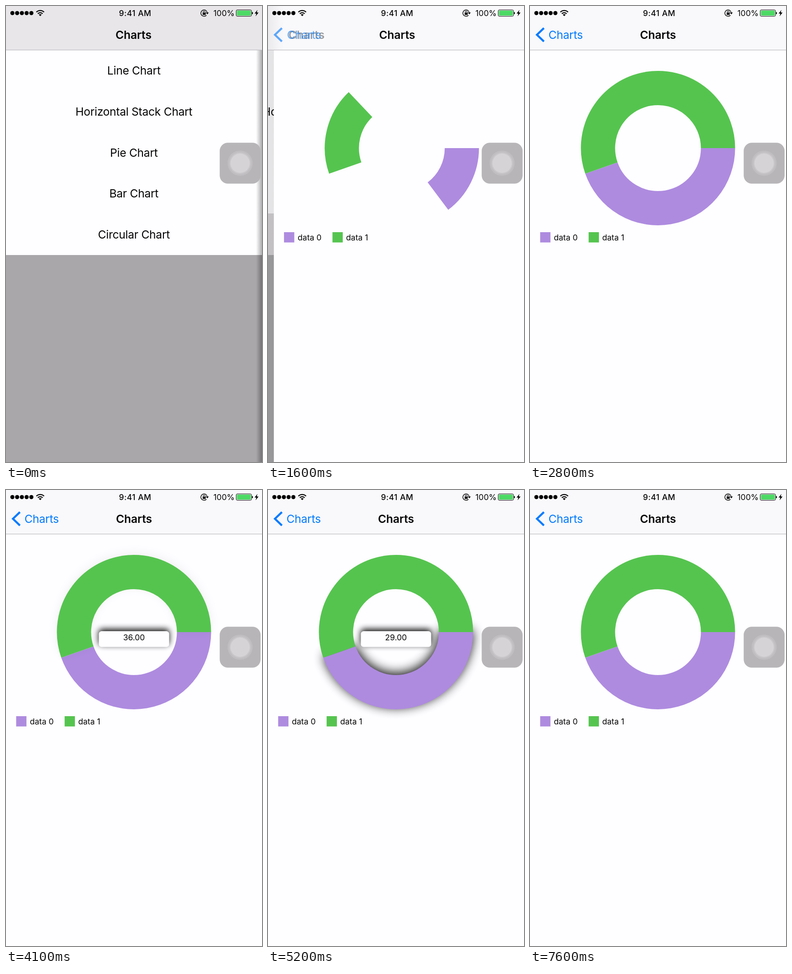
Write an HTML page that moves like this. It is 561x998 px and loops after 8 s.

```html
<!DOCTYPE html>
<html lang="en">
<head>
<meta charset="utf-8">
<title>Charts</title>
<style>
  html, body { margin: 0; width: 100%; height: 100%; overflow: hidden; background: #fefdff; }
  svg { display: block; width: 561px; height: 998px; }
  text { font: 400 24.6px Inter, "Open Sans", sans-serif; letter-spacing: -.27px; fill: #050505; }
  .mid { text-anchor: middle; }
  .title { font-weight: 600; letter-spacing: -.1px; }
  .small { font-size: 17.5px; letter-spacing: 0; }
  .clock { font-weight: 500; letter-spacing: .5px; }
  .sector { fill: none; stroke-width: 75; }
  .purple { stroke: #ae8bdf; }
  .green { stroke: #55c44f; }
  .shade { stroke: #000; }
</style>
</head>
<body>
<svg viewBox="0 0 561 998">
  <defs>
    <filter id="soft" filterUnits="userSpaceOnUse" x="40" y="70" width="480" height="480"><feGaussianBlur stdDeviation="12"/></filter>
    <filter id="tipSoft" filterUnits="userSpaceOnUse" x="150" y="260" width="260" height="130"><feGaussianBlur stdDeviation="7"/></filter>
    <linearGradient id="edge">
      <stop offset="0" stop-opacity="0"/><stop offset="1" stop-opacity=".32"/>
    </linearGradient>
    <linearGradient id="bar">
      <stop offset="0" stop-color="#e8e6e9"/><stop offset="1" stop-color="#f9f8fb"/>
    </linearGradient>
  </defs>

  <g id="menu">
    <rect width="561" height="998" fill="#a9a7aa"/>
    <rect y="90" width="561" height="455" fill="#fefdff"/>
    <rect id="pressed" y="454" width="561" height="91" fill="#d8d6d9"/>
    <g id="rows"></g>
  </g>
  <rect id="dim" width="561" height="998"/>

  <g id="page">
    <rect id="pageEdge" x="-13" width="13" height="998" fill="url(#edge)"/>
    <rect width="561" height="998" fill="#fefdff"/>
    <g id="ring"></g>
    <g fill="#ae8bdf"><rect x="22.3" y="495" width="22.5" height="22.5"/></g>
    <g fill="#55c44f"><rect x="128.5" y="495" width="22.5" height="22.5"/></g>
    <text class="small" x="52.3" y="513">data 0</text>
    <text class="small" x="158.3" y="513">data 1</text>
    <g id="tip">
      <rect x="203.5" y="304.5" width="154" height="34.5" rx="6" filter="url(#tipSoft)" opacity=".95"/>
      <rect x="203.5" y="309" width="154" height="34.5" rx="6" fill="#fefdff"/>
      <text id="tipText" class="small mid" x="280.5" y="329"></text>
    </g>
  </g>

  <rect id="barLeft" width="561" height="96" fill="#e8e6e9"/>
  <rect id="barBlend" width="40" height="96" fill="url(#bar)"/>
  <rect id="barRight" width="601" height="96" fill="#f9f8fb"/>
  <rect y="95.8" width="561" height="1.2" fill="#bcbabf"/>
  <text id="oldTitle" class="title" x="240" y="72">Charts</text>
  <text id="newTitle" class="title mid" x="280.5" y="72">Charts</text>
  <g id="back">
    <path d="M30.5 48.3 15.2 63 30.5 77.7" fill="none" stroke="#007aff" stroke-width="4.4"/>
    <text id="backText" x="40.5" y="72" style="fill:#007aff">Charts</text>
  </g>

  <g id="dots"></g>
  <g fill="none" stroke="#050505" stroke-width="2.4">
    <path d="M66.6 13.4a11.8 11.8 0 0 1 16.8 0"/>
    <path d="M69.8 16.8a7.3 7.3 0 0 1 10.4 0"/>
  </g>
  <path d="M75 22.2 71.9 19a4.4 4.4 0 0 1 6.2 0Z" fill="#050505"/>
  <text class="small clock mid" x="283" y="22">9:41 AM</text>
  <g fill="none" stroke="#050505" stroke-width="1.5">
    <path d="M439.3 20.2a7 7 0 1 1 1.7-5.4"/>
    <path d="M432.3 15v-2a2 2 0 0 1 4 0v2" stroke-width="1.2"/>
  </g>
  <rect x="431" y="14.6" width="6.6" height="5" rx=".6"/>
  <path d="M438 14.3h6.4l-3.2 4Z"/>
  <text class="small" x="454.5" y="22">100%</text>
  <rect x="504.5" y="8.5" width="33.5" height="14" rx="2.5" fill="none" stroke="#050505"/>
  <rect x="506" y="10" width="30.5" height="11" rx="1.2" fill="#4cd964"/>
  <path d="M539 13q2.2 0 2.2 2.5t-2.2 2.5Z"/>
  <path d="M551 8.5 544.8 16.4h3.8l-1.6 6 6.4-8.2h-3.9Z"/>

  <rect x="468.3" y="299.2" width="89.6" height="89.6" rx="18" fill="#b7b5b8"/>
  <g fill="#c0bec1"><circle cx="513" cy="344" r="27.5"/></g>
  <circle cx="513" cy="344" r="23.8" fill="#c8c6c9"/>
  <circle cx="513" cy="344" r="21.2" fill="#d5d3d6"/>
</svg>
<script>
const LOOP = 8000, STEP = 100, W = 561;
const PUSH = 1289, OMEGA = 18.26;     // critically damped page push
const GROW = 1270, GROW_TIME = 1000;  // ring drawing
const PULSE = 400;                    // half of a shadow pulse
const TIP_OFF = 5900, TIP_FADE = 300;
const VALUES = [29, 36];
const TAPS = [[3100, 0], [4080, 1], [4830, 0]];

const $ = id => document.getElementById(id);
const clamp = v => Math.min(1, Math.max(0, v));
const move = (id, x) => $(id).setAttribute('transform', `translate(${x} 0)`);
const fade = (id, a) => { $(id).style.opacity = a; };

function add(parent, tag, attrs, text = '') {
  const el = document.createElementNS('http://www.w3.org/2000/svg', tag);
  for (const k in attrs) el.setAttribute(k, attrs[k]);
  el.textContent = text;
  return $(parent).appendChild(el);
}

['Line', 'Horizontal Stack', 'Pie', 'Bar', 'Circular'].forEach((name, i) =>
  add('rows', 'text', { class: 'mid', x: 280.3, y: 150 + 89.75 * i }, name + ' Chart'));
for (let i = 0; i < 5; i++) add('dots', 'circle', { cx: 14 + 10.4 * i, cy: 15.5, r: 4.5 });

function arc(from, to) {
  const at = f => {
    const a = f * 2 * Math.PI;
    return `${280.5 + 131.5 * Math.cos(a)} ${311 + 131.5 * Math.sin(a)}`;
  };
  return `M${at(from)}A131.5 131.5 0 ${to - from > .5 ? 1 : 0} 1 ${at(to)}`;
}

const split = VALUES[0] / (VALUES[0] + VALUES[1]);
const sectors = [['purple', 0, split], ['green', split, 1]].map(([color, from, to]) => {
  const d = arc(from, to);
  const shade = add('ring', 'path', {
    d, class: 'sector shade', filter: 'url(#soft)', transform: 'translate(0 -4.5)'
  });
  return { shade, body: add('ring', 'path', { d, class: 'sector ' + color, pathLength: 1 }) };
});

function drawPush(t) {
  const s = Math.max(0, t - PUSH) / 1000, u = OMEGA * s;
  const p = s > .5 ? 1 : 1 - (1 + u) * Math.exp(-u);
  const lin = clamp(s / .5), x = W * (1 - p);
  move('menu', -.3 * W * p);
  move('page', x);
  fade('pressed', s > 0 ? 1 : 0);
  fade('dim', .1 * p);
  fade('pageEdge', 1 - p);
  const blend = p === 1 ? -40 : p === 0 ? W : x - 20;
  move('barBlend', blend);
  move('barRight', blend + 40);
  move('oldTitle', -199.5 * p);
  fade('oldTitle', 1 - lin);
  move('newTitle', 112 * (1 - p));
  fade('newTitle', p);
  move('backText', 40 * (1 - p));
  fade('back', lin);
}

function drawChart(t) {
  const grown = clamp((t - GROW) / GROW_TIME);
  const tap = TAPS.filter(([at]) => t >= at).pop();
  sectors.forEach(({ shade, body }, i) => {
    body.setAttribute('stroke-dasharray', `${grown} 2`);
    const wave = tap && tap[1] === i ? 1 - Math.abs(t - tap[0] - PULSE) / PULSE : 0;
    shade.style.opacity = clamp(wave);
  });
  fade('tip', tap ? clamp(1 - (t - TIP_OFF) / TIP_FADE) : 0);
  $('tipText').textContent = tap ? VALUES[tap[1]].toFixed(2) : '';
}

const start = performance.now();
function frame() {
  const now = (performance.now() - start) % LOOP;
  const t = Math.floor(now / STEP) * STEP;
  drawPush(t);
  drawChart(t);
  requestAnimationFrame(frame);
}
frame();
</script>
</body>
</html>
```
